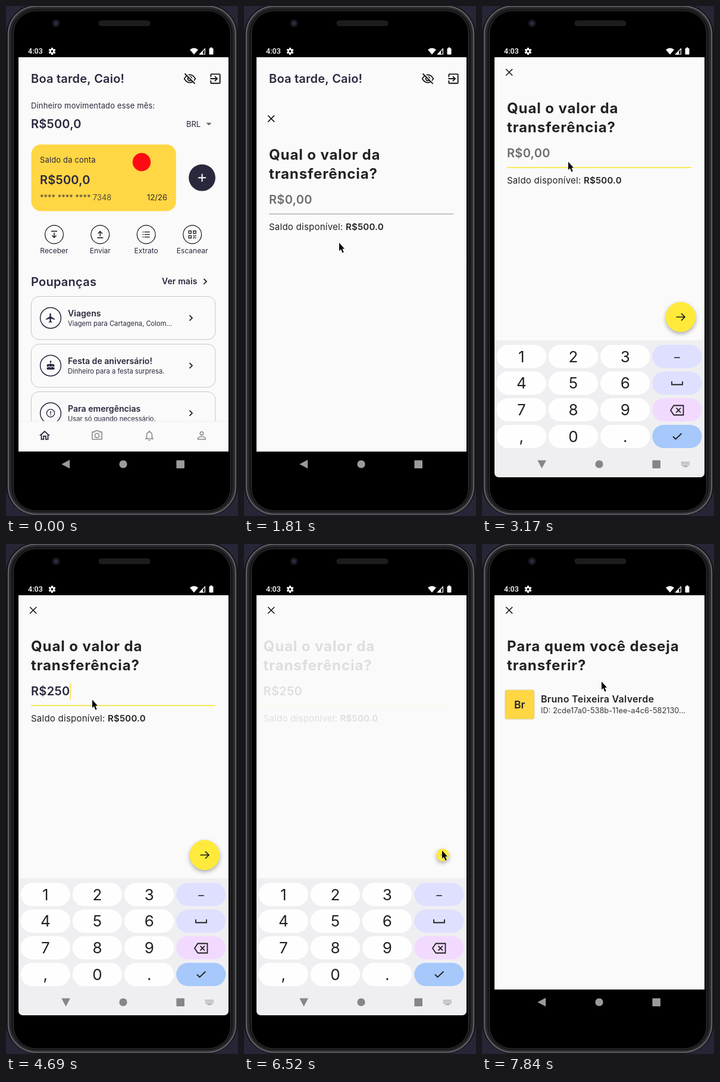
An HTML page with a canvas that plays this animation: 390x856 px, repeating every 8000 ms.

```html
<!DOCTYPE html>
<html lang="pt">
<head>
<meta charset="utf-8">
<title>Transferência</title>
<style>
html, body { margin: 0; width: 100%; height: 100%; overflow: hidden; background: #262637; }
canvas { display: block; width: 390px; height: 856px; }
</style>
</head>
<body>
<canvas id="stage"></canvas>
<script>
const W = 390, H = 856, LOOP = 8000, STEP = 70;
const INK = '#2a283d', DARK = '#222225', PAPER = '#fafafa', GOLD = '#ffd644', YELLOW = '#ffea3b';
const canvas = document.getElementById('stage');
const ctx = canvas.getContext('2d');
const dpr = window.devicePixelRatio || 1;
canvas.width = W * dpr;
canvas.height = H * dpr;

const starts = [0, 510, 1670, 2360, 2630, 3170, 3570, 3970, 4430, 4690, 5220, 6250, 6520, 7080, 7350];

function snap(t) {
  const s = starts.filter(v => v <= t).pop();
  return s + Math.floor((t - s) / STEP) * STEP;
}

const ramp = (t, a, b) => Math.min(1, Math.max(0, (t - a) / (b - a)));
const lerp = (a, b, p) => a + (b - a) * p;
const smooth = p => p * p * (3 - 2 * p);

function bezier(x1, y1, x2, y2) {
  const at = (s, a, b) => 3 * (1 - s) * (1 - s) * s * a + 3 * (1 - s) * s * s * b + s * s * s;
  return x => {
    let lo = 0, hi = 1;
    for (let i = 0; i < 24; i++) {
      const mid = (lo + hi) / 2;
      if (at(mid, x1, x2) < x) lo = mid; else hi = mid;
    }
    return at(lo, y1, y2);
  };
}
const easeSheet = bezier(.35, .91, .33, .97);
const easePage = bezier(.4, 0, .2, 1);
const easeKeys = bezier(0, 0, .2, 1);

// Drawing helpers
function text(str, x, y, size, o = {}) {
  ctx.font = `${o.weight || 400} ${size}px ${o.font || 'Inter'}, sans-serif`;
  ctx.letterSpacing = (o.gap || 0) + 'px';
  ctx.textAlign = o.align || 'left';
  ctx.fillStyle = o.color || INK;
  ctx.fillText(str, x, y);
}

function box(x, y, w, h, r, fill, line, width = 1) {
  ctx.beginPath();
  ctx.roundRect(x, y, w, h, r);
  paint(fill, line, width);
}

function disc(x, y, r, fill, line, width = 1) {
  ctx.beginPath();
  ctx.arc(x, y, r, 0, 7);
  paint(fill, line, width);
}

function paint(fill, line, width) {
  if (fill) { ctx.fillStyle = fill; ctx.fill(); }
  if (line) { ctx.strokeStyle = line; ctx.lineWidth = width; ctx.stroke(); }
}

function group(draw, x = 0, y = 0, scale = 1, alpha = 1, turn = 0) {
  ctx.save();
  ctx.translate(x, y);
  ctx.rotate(turn);
  ctx.scale(scale, scale);
  ctx.globalAlpha *= alpha;
  draw();
  ctx.restore();
}

function stroke(d, x, y, color, width) {
  group(() => {
    ctx.strokeStyle = color;
    ctx.lineWidth = width;
    ctx.stroke(new Path2D(d));
  }, x, y);
}

function solid(d, x, y, color) {
  group(() => {
    ctx.fillStyle = color;
    ctx.fill(new Path2D(d));
  }, x, y);
}

// Icons on a 24 unit grid, centred on x, y
const icons = {
  leave: 'M10.1 15.6L11.5 17l5-5-5-5-1.4 1.4L12.7 11H3v2h9.7zM19 3H5a2 2 0 0 0-2 2v4h2V5h14v14H5v-4H3v4a2 2 0 0 0 2 2h14a2 2 0 0 0 2-2V5a2 2 0 0 0-2-2z',
  plane: 'M21 16v-2l-8-5V3.5a1.5 1.5 0 0 0-3 0V9l-8 5v2l8-2.5V19l-2 1.5V22l3.5-1 3.5 1v-1.5L13 19v-5.5z',
  cake: 'M12 6a2 2 0 0 0 2-2c0-.4-.1-.7-.3-1L12 0l-1.7 3c-.2.3-.3.6-.3 1a2 2 0 0 0 2 2zM18 9h-5V7h-2v2H6a3 3 0 0 0-3 3v1.5a2 2 0 0 0 3.4 1.4l2.1-2.1 2.1 2.1a2 2 0 0 0 2.8 0l2.1-2.1 2.1 2.1A2 2 0 0 0 21 13.5V12a3 3 0 0 0-3-3zM16.6 16l-1.1-1.1-1 1.1a3.5 3.5 0 0 1-5 0l-1-1.1-1.1 1.1A3.5 3.5 0 0 1 3 16.4V21a1 1 0 0 0 1 1h16a1 1 0 0 0 1-1v-4.6A3.5 3.5 0 0 1 16.6 16z',
  home: 'M12 5.7l5 4.5V18h-2v-6H9v6H7v-7.8zM12 3L2 12h3v8h6v-6h2v6h6v-8h3z',
  camera: 'M14.1 4L16 6h4v12H4V6h4l1.9-2zM15 2H9L7.2 4H4a2 2 0 0 0-2 2v12a2 2 0 0 0 2 2h16a2 2 0 0 0 2-2V6a2 2 0 0 0-2-2h-3.2zM12 9a3 3 0 1 1 0 6 3 3 0 0 1 0-6zM12 7a5 5 0 1 0 0 10 5 5 0 0 0 0-10z',
  bell: 'M12 22a2 2 0 0 0 2-2h-4a2 2 0 0 0 2 2zM18 16v-5c0-3.1-1.6-5.6-4.5-6.3V4a1.5 1.5 0 0 0-3 0v.7C7.6 5.4 6 7.9 6 11v5l-2 2v1h16v-1zM16 17H8v-6c0-2.5 1.5-4.5 4-4.5s4 2 4 4.5z',
  person: 'M12 5.9a2.1 2.1 0 1 1 0 4.2 2.1 2.1 0 0 1 0-4.2zM12 14.9c3 0 6.1 1.5 6.1 2.1v1.1H5.9V17c0-.6 3.1-2.1 6.1-2.1zM12 4a4 4 0 1 0 0 8 4 4 0 0 0 0-8zM12 13c-2.7 0-8 1.3-8 4v3h16v-3c0-2.7-5.3-4-8-4z'
};

function icon(name, x, y, size, color) {
  group(() => {
    ctx.translate(-12, -12);
    ctx.fillStyle = color;
    ctx.fill(new Path2D(icons[name]), 'evenodd');
  }, x, y, size / 24);
}

const chevron = (x, y) => stroke('M-2.5-4.5L2 0L-2.5 4.5', x, y, DARK, 1.8);

// Phone body and system bars
function phone() {
  ctx.fillStyle = '#262637';
  ctx.fillRect(0, 0, W, H);
  box(1, -2, 388, 857, 50, '#141417', '#0c0c0e', 1);
  box(4, .5, 382, 852.5, 47, '#232326', '#5a5a5f', 2.6);
  box(8, 4, 374, 846, 43, '#151517', '#2d2d30', 1.5);
  box(12.5, 8, 365, 839, 38, '#000', '#36363a', 1);
  disc(84, 29, 6.5, '#17171e');
  disc(84, 29, 3.2, '#2a2b3e');
  box(156, 25, 86, 8, 4, '#1c1c1e', '#262628', 1);
}

function statusBar() {
  text('4:03', 37, 80.3, 12.6, { font: 'Roboto', weight: 500, color: '#fff' });
  group(() => {
    ctx.fillStyle = '#fff';
    for (let i = 0; i < 6; i++) {
      ctx.rotate(Math.PI / 3);
      ctx.fillRect(-1.5, -6, 3, 4);
    }
    disc(0, 0, 3.2, null, '#fff', 2.2);
  }, 77.5, 76);
  solid('M0 5.5L-7-2.8Q0-8.4 7-2.8z', 316, 76, '#fff');
  stroke('M-4.4 5L4.4 5L4.4-4.2z', 330, 76, '#fff', 1.2);
  solid('M-5 5.5L1 5.5L1-.6z', 330, 76, '#fff');
  box(341.5, 71, 7, 10.5, 1, '#fff');
  ctx.fillRect(343.5, 69.5, 3, 2);
}

function systemNav(keys, active) {
  const c = keys > .5 ? '#85858a' : '#9b9b9b';
  const turn = active ? -Math.PI / 2 * Math.max(keys, .06) : 0;
  group(() => solid('M-7.3 0L6.5-7.3L6.5 7.3z', 0, 0, c), 100.6, 769, 1, 1, turn);
  disc(197, 769, 6.6, c);
  box(286.4, 762.4, 13.6, 13.6, 1, c);
  if (!active) return;
  for (let row = 0; row < 3; row++)
    for (let i = 0; i < 6; i++) ctx.fillRect(335 + i * 2.4, 765 + row * 2.5, 1.5, 1.4);
  ctx.fillRect(338.5, 772.3, 7, 1.3);
}

// Home page
function action(x, label, draw) {
  disc(x, 383.5, 15.4, null, '#151518', 1.2);
  draw(x, 383.5);
  text(label, x, 415.3, 12, { align: 'center' });
}

function listIcon(x, y) {
  for (let i = -1; i < 2; i++) {
    ctx.fillStyle = '#151518';
    ctx.fillRect(x - 6, y + i * 4.2 - .7, 1.6, 1.5);
    ctx.fillRect(x - 3, y + i * 4.2 - .6, 9, 1.3);
  }
}

function scanIcon(x, y) {
  stroke('M-6-6h4.2v4.2h-4.2zM1.8-6h4.2v4.2h-4.2zM-6 1.8h4.2v4.2h-4.2z', x, y, '#151518', 1.3);
  stroke('M1.5 2h2.2M4.6 2h2M2 4.3h2M4.5 5.8h2M1.5 6.3h1.5', x, y, '#151518', 1.5);
}

function saving(y, title, sub, draw) {
  box(42.4, y, 309.6, 72.3, 13, null, '#c6c6ca', 1);
  disc(75, y + 36, 17.4, null, INK, 1.5);
  draw(75, y + 36);
  text(title, 104, y + 33.4, 14.1, { weight: 600 });
  text(sub, 104, y + 49.3, 11.2);
  chevron(311, y + 36);
}

function home() {
  const bold = { weight: 600, gap: .2 };
  text('Boa tarde, Caio!', 42, 129.3, 20, bold);
  stroke('M-9.3 0Q-5.5-6.6 0-6.6T9.3 0Q5.5 6.6 0 6.6T-9.3 0zM3.4 0A3.4 3.4 0 1 1-3.4 0A3.4 3.4 0 1 1 3.4 0z', 309, 122, '#151518', 1.7);
  stroke('M-8.2-9.4L9.6 8.4', 309.4, 121, PAPER, 2);
  stroke('M-8.5-8.5L8.7 8.7', 309, 122, '#151518', 1.8);
  icon('leave', 352, 122, 23, '#151518');
  text('Dinheiro movimentado esse mês:', 42, 171.8, 13, { gap: .15 });
  text('R$500,0', 42, 205.2, 20, bold);
  text('BRL', 303, 202.6, 13);
  solid('M-4.6-2.3H4.6L0 2.3z', 341, 198.3, '#68686e');

  box(42.5, 232.5, 243.3, 111.7, 16, GOLD);
  text('Saldo da conta', 57, 262.7, 13, { gap: .15 });
  text('R$500,0', 57, 298.6, 20, bold);
  text('**** **** **** 7348', 57, 325.6, 13, { weight: 300 });
  text('12/26', 271, 325.6, 13, { align: 'right' });
  disc(228, 262, 15.2, '#ff0a12');
  disc(329.6, 288.2, 22.4, INK);
  stroke('M-6.5 0H6.5M0-6.5V6.5', 329.6, 288.2, '#fff', 2);

  action(81, 'Receber', (x, y) => stroke('M0-3V5M-3.6 1.6L0 5.2L3.6 1.6M-5-5.5H5', x, y, '#151518', 1.4));
  action(158.3, 'Enviar', (x, y) => stroke('M0 3V-5M-3.6-1.6L0-5.2L3.6-1.6M-5 5.5H5', x, y, '#151518', 1.4));
  action(235.7, 'Extrato', listIcon);
  action(313.2, 'Escanear', scanIcon);

  text('Poupanças', 42, 469.6, 20, { weight: 600, gap: .25 });
  text('Ver mais', 262, 467.2, 14, { weight: 600, gap: .1 });
  chevron(335, 462.3);
  saving(487.6, 'Viagens', 'Viagem para Cartagena, Colom...', (x, y) => icon('plane', x, y, 19, INK));
  saving(567.6, 'Festa de aniversário!', 'Dinheiro para a festa surpresa.', (x, y) => icon('cake', x, y - .5, 17, INK));
  saving(647.4, 'Para emergências', 'Usar só quando necessário.', (x, y) => {
    disc(x, y, 6.6, null, INK, 1.3);
    stroke('M0-3.5V.8M0 2V3.5', x, y, INK, 1.5);
  });

  ctx.fillStyle = PAPER;
  ctx.fillRect(21, 697, 353, 51);
  ctx.fillStyle = '#eeeef0';
  ctx.fillRect(21, 696.5, 353, 1);
  icon('home', 65, 721, 22, INK);
  ['camera', 'bell', 'person'].forEach((n, i) => icon(n, 153 + i * 88, 721, 21.5, '#929297'));
}

// Transfer pages
function heading(a, b) {
  const style = { weight: 700, gap: .9, color: DARK };
  text(a, 42, 180.2, 24, style);
  text(b, 42, 212.2, 24, style);
}

function amountAt(t) {
  return t < 3570 ? '' : t < 3970 ? 'R$2' : t < 4690 ? 'R$25' : 'R$250';
}

function caretOn(t) {
  return [[2630, 3165], [3570, 4430], [4690, 5220], [5710, 6250]].some(([a, b]) => t >= a && t < b);
}

function amountForm(t) {
  heading('Qual o valor da', 'transferência?');
  const typed = amountAt(t), focus = ramp(t, 2630, 2760);
  text(typed || 'R$0,00', 42, 254.2, 20, { weight: 600, gap: .3, color: typed ? INK : '#6c6c6f' });
  const edge = typed ? 42 + ctx.measureText(typed).width : 42;
  if (caretOn(t)) {
    ctx.fillStyle = '#f6e04a';
    ctx.fillRect(edge, 234, 1.6, 27);
  }
  ctx.fillStyle = `rgb(${lerp(145, 248, focus)},${lerp(145, 230, focus)},${lerp(145, 70, focus)})`;
  const thick = focus > 0 ? 1.8 : 1;
  ctx.fillRect(42, 271.2 - thick / 2, 310, thick);
  text('Saldo disponível:', 42, 298.4, 15, { gap: .25, color: DARK });
  text('R$500.0', 171, 298.4, 15, { weight: 600, gap: .2, color: DARK });
}

function contactForm() {
  heading('Para quem você deseja', 'transferir?');
  box(38.8, 245, 49.2, 49, 3, GOLD, '#dcd3ae', 1);
  text('Br', 63.3, 275.6, 17.5, { weight: 600, align: 'center', color: DARK });
  text('Bruno Teixeira Valverde', 99, 266.3, 16, { weight: 600, gap: .3, color: DARK });
  text('ID: 2cde17a0-538b-11ee-a4c6-582130...', 99, 284.4, 12.8, { color: '#38383b' });
}

function fab(y, scale) {
  if (scale <= 0) return;
  group(() => {
    ctx.save();
    ctx.shadowColor = 'rgba(0,0,0,.32)';
    ctx.shadowBlur = 7 * dpr;
    ctx.shadowOffsetY = 3 * dpr;
    disc(0, 0, 25.2, YELLOW);
    ctx.restore();
    stroke('M-7.5 0H7M1-6L7 0L1 6', 0, 0, '#1b1b1b', 1.7);
  }, 334, y, scale);
}

function keyboard(keys) {
  if (keys <= 0) return;
  const rows = ['123–', '456 ', '789 ', ',0. '];
  const tints = ['#dfe0ff', '#dfe0ff', '#f2daff', '#a6c8fa'];
  ctx.save();
  ctx.beginPath();
  ctx.roundRect(21, 500, 353, 291, 7);
  ctx.clip();
  ctx.translate(0, 230 * (1 - keys));
  ctx.fillStyle = '#efeff2';
  ctx.fillRect(21, 561, 353, 230);
  rows.forEach((row, j) => [...row].forEach((ch, i) => {
    const x = 24.6 + i * 87.2, y = 568.8 + j * 44.7;
    box(x, y, 83.3, 39, 19.5, i < 3 ? '#fefefe' : tints[j]);
    text(ch, x + 41.7, y + (i < 3 ? 28.9 : 27), i < 3 ? 26 : 19, { align: 'center', color: '#202124' });
  }));
  stroke('M-9-3V2.5H9V-3', 328, 633, '#202124', 1.8);
  stroke('M-11 0L-5.5-8H10.5V8H-5.5zM-1.5-3.8L6 3.8M6-3.8L-1.5 3.8', 328, 678.5, '#202124', 1.8);
  stroke('M-7 0L-2.5 4.5L7.5-5', 328, 722.5, '#202124', 1.8);
  ctx.restore();
}

function pointer(t) {
  if (t < 510) return;
  const legs = [[440, 1070, 398, 812], [1950, 2360, 160, 397.5], [5160, 5850, 145, 261.5], [7290, 7840, 333, 514.5], [LOOP, LOOP + 1, 201, 231]];
  const i = Math.max(0, legs.findLastIndex(l => t >= l[0]));
  const [a, b, x, y] = legs[i], next = legs[i + 1];
  const p = smooth(ramp(t, a, b));
  const d = 'M0 0V13.6L3 10.8L5.4 16.8L7.7 15.8L5.3 10H9z';
  const px = lerp(x, next[2], p), py = lerp(y, next[3], p);
  stroke(d, px, py, '#fff', .9);
  solid(d, px, py, '#000');
}

function frame(now) {
  const t = snap(now);
  ctx.setTransform(dpr, 0, 0, dpr, 0, 0);
  phone();
  statusBar();

  const showing = t >= 1670;
  const keysIn = easeKeys(ramp(t, 2700, 3080));
  const keysOut = easePage(ramp(t, 6640, 7010));
  const keys = keysIn * (1 - keysOut);
  const swap = ramp(t, 6436, 6736), shift = easePage(swap);

  ctx.save();
  ctx.beginPath();
  ctx.rect(21, 86, 353, 661.5);
  ctx.clip();
  ctx.fillStyle = PAPER;
  ctx.fillRect(21, 86, 353, 662);
  if (t < 2200) home();
  if (showing) {
    const drop = 705 * (1 - easeSheet(ramp(t, 1586, 2086)));
    ctx.translate(0, drop);
    ctx.fillStyle = PAPER;
    ctx.fillRect(21, 65, 353, 690);
    stroke('M-5.5-5.5L5.5 5.5M5.5-5.5L-5.5 5.5', 45.7, 111.3, '#151518', 1.6);
    if (swap < .32) group(() => amountForm(t), -30 * shift, 0, 1, 1 - swap / .32);
    if (swap > .3) group(contactForm, 30 * (1 - shift), 0, 1, (swap - .3) / .7);
    fab(708 - 186 * keys, 1 - ramp(t, 6404, 6604));
  }
  ctx.restore();

  keyboard(keys);
  systemNav(keys, t >= 2700 && t < 7010);
  pointer(t);
}

function loop() {
  frame(performance.now() % LOOP);
  requestAnimationFrame(loop);
}
loop();
</script>
</body>
</html>
```
